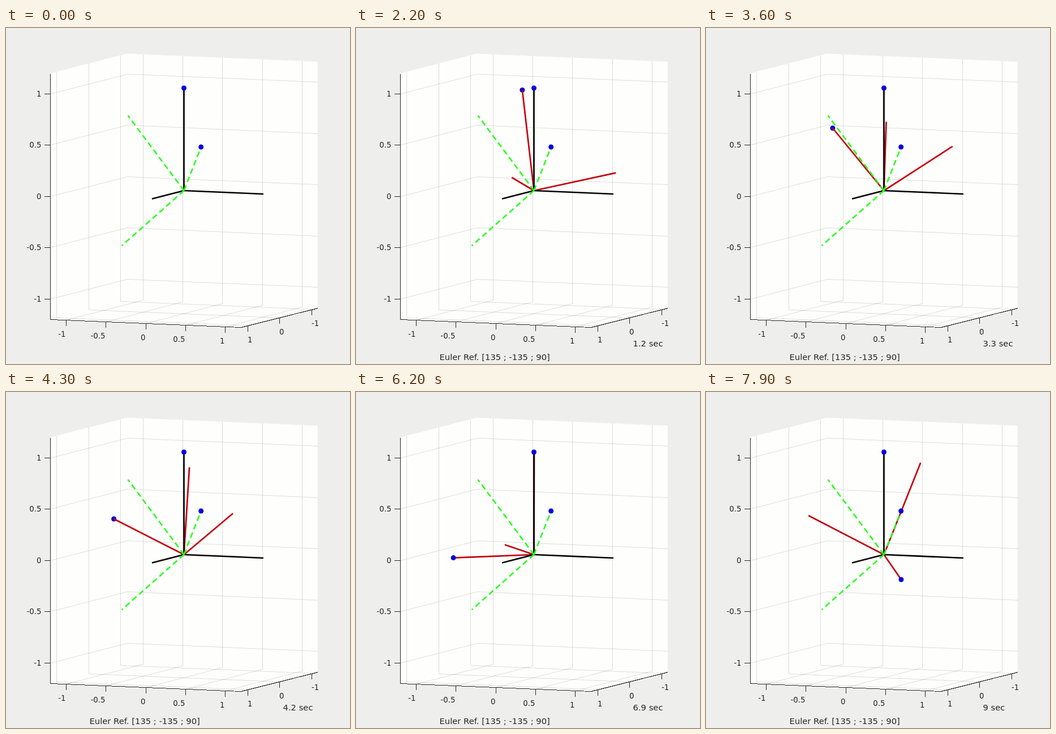
An HTML page that plays this animation: 608 by 593 pixels, repeating every 8 s.

```html
<!DOCTYPE html>
<html lang="en">
<head>
<meta charset="utf-8">
<title>Attitude manoeuvre</title>
<style>
  html, body { margin: 0; width: 100%; height: 100%; overflow: hidden; background: #eeeeec; }
  svg { display: block; width: 608px; height: 593px; }
  text { font-family: "DejaVu Sans", Verdana, sans-serif; font-size: 13.33px; fill: #262626; }
  .note { font-size: 14.75px; }
  .wall { fill: #fefefc; }
  .grid { stroke: #262626; stroke-opacity: .15; }
  .axis { stroke: #262626; fill: none; shape-rendering: crispEdges; }
  .base { stroke: #000; stroke-width: 2.7; }
  .body { stroke: #c4000f; stroke-width: 2.7; }
  .goal { stroke: #2cff22; stroke-width: 2.7; stroke-dasharray: 10 6; }
  .dot { fill: #0800dc; }
</style>
</head>
<body>
<svg id="stage" viewBox="0 0 608 593"></svg>
<script>
const LOOP = 8000, REF_AT = 1000, RUN_AT = 1300, FRAME = 100;
const stage = document.getElementById("stage");

// Orthographic view of data space
const project = ([x, y, z]) => [
  314.5 + 140.5 * x - 56.5 * y,
  287 + 6 * x + 14.5 * y - 181 * z
];
const depth = ([x, y, z]) => 0.37 * x + 0.925 * y + 0.087 * z;
const ORIGIN = project([0, 0, 0]);

// The plot box is drawn on whole pixels
function snap(point) {
  const [x, y] = project(point);
  return [Math.round(x) + 0.5, Math.floor(y) + 0.5];
}

function add(tag, attrs, parent = stage) {
  const el = document.createElementNS("http://www.w3.org/2000/svg", tag);
  for (const key in attrs) el.setAttribute(key, attrs[key]);
  parent.appendChild(el);
  return el;
}
function line(cls, [x1, y1], [x2, y2], parent) {
  return add("line", { class: cls, x1, y1, x2, y2 }, parent);
}
function dot([cx, cy], parent) {
  return add("circle", { class: "dot", cx, cy, r: 4.5 }, parent);
}
function label(str, x, y, anchor = "start", cls = "") {
  const el = add("text", { x, y, "text-anchor": anchor, class: cls });
  el.textContent = str;
  return el;
}

// Plot box
const L = 1.2;
const rim = [[-L, L, L], [-L, L, -L], [L, L, -L], [L, -L, -L]];
const wall = [...rim, [L, -L, L], [-L, -L, L]];
add("polygon", { class: "wall", points: wall.map(project).join(" ") });

const grid = (a, b) => line("grid", snap(a), snap(b));
function tick(at, dx, dy) {
  const [x, y] = snap(at);
  line("axis", [x, y], [x + dx, y + dy]);
  return [x, y];
}
for (const v of [-1, -0.5, 0, 0.5, 1]) {
  grid([v, -L, -L], [v, -L, L]);
  grid([v, -L, -L], [v, L, -L]);
  grid([-L, L, v], [-L, -L, v]);
  grid([-L, -L, v], [L, -L, v]);
  const [x, y] = tick([v, L, -L], 0, 10);
  label(v, x - 1, y + 29, "end");
  const [zx, zy] = tick([-L, L, v], -11, 0);
  label(v, zx - 16, zy + 4.5, "end");
}
for (const v of [-1, 0, 1]) {
  grid([-L, v, -L], [-L, v, L]);
  grid([-L, v, -L], [L, v, -L]);
  const [x, y] = tick([L, v, -L], 0, 10);
  label(v, x - 0.5, y + 29);
}
add("polyline", { class: "axis", points: rim.map(snap).join(" ") });

// Moving frame below, fixed and goal frames above
const body = add("g", {});
const bodyDot = dot(ORIGIN, body);
const bodyLines = [0, 1, 2].map(() => line("body", ORIGIN, ORIGIN, body));

function triad(cls, ends) {
  for (const end of ends) line(cls, ORIGIN, end);
  dot(ends[2]);
}
triad("base", [[1, 0, 0], [0, 1, 0], [0, 0, 1]].map(project));
triad("goal", [[215.5, 154.5], [204.5, 384.3], [344.7, 210]]);

const ref = label("Euler Ref. [135 ; -135 ; 90]", 147.5, 586, "start", "note");
const clock = label("", 489.5, 562, "start", "note");

// Moments at which the picture rests for one frame
const rests = [1500, 2100, 3000, 3400, 4400, 4800, 6700, 7000, 7300, 7700];
function stepAt(time) {
  if (time < RUN_AT) return 0;
  return 1 + Math.floor((time - RUN_AT) / FRAME) - rests.filter(t => t <= time).length;
}

// Key poses: step, seconds, roll, pitch, yaw
const poses = [
  [0, 0, 0, 0, 0],
  [3, 0.4, 2.5, -2.5, -1.7],
  [14, 2.3, 31, -21.2, -26.3],
  [18, 3, 46, -23, -43.8],
  [27, 4.2, 71.1, -19.7, -74.5],
  [37, 5.8, 87.4, -4.5, -114.4],
  [48, 7.6, 90, -1, -151],
  [51, 8.1, 89.8, -2, -175.5],
  [57, 9, 100, -23.7, -217.7]
];

// Smooth curve through one column of the key poses
function slope(i, col) {
  const gap = j => poses[j + 1][0] - poses[j][0];
  const rate = j => (poses[j + 1][col] - poses[j][col]) / gap(j);
  if (i === 0) return 0;
  if (i === poses.length - 1) return rate(i - 1);
  return (rate(i - 1) * gap(i) + rate(i) * gap(i - 1)) / (gap(i - 1) + gap(i));
}
function curve(step, col) {
  const next = poses.findIndex(p => p[0] > step);
  const i = (next < 0 ? poses.length - 1 : next) - 1;
  const a = poses[i], b = poses[i + 1];
  const h = b[0] - a[0], s = (step - a[0]) / h, r = 1 - s;
  return a[col] * (1 + 2 * s) * r * r + b[col] * (3 - 2 * s) * s * s
    + h * s * r * (slope(i, col) * r - slope(i + 1, col) * s);
}

// Body axes for roll, pitch and yaw
function axes(angles) {
  const [sr, sp, sy] = angles.map(Math.sin);
  const [cr, cp, cy] = angles.map(Math.cos);
  return [
    [cy * cp, sy * cp, -sp],
    [cy * sp * sr - sy * cr, sy * sp * sr + cy * cr, cp * sr],
    [cy * sp * cr + sy * sr, sy * sp * cr - cy * sr, cp * cr]
  ];
}

function render(time) {
  const step = stepAt(time);
  body.style.display = ref.style.display = time < REF_AT ? "none" : "";
  clock.textContent = step ? +curve(step, 1).toFixed(1) + " sec" : "";

  const dirs = axes([2, 3, 4].map(col => curve(step, col) * Math.PI / 180));
  const ends = dirs.map(project);
  ends.forEach(([x, y], i) => {
    bodyLines[i].setAttribute("x2", x);
    bodyLines[i].setAttribute("y2", y);
  });
  bodyDot.setAttribute("cx", ends[2][0]);
  bodyDot.setAttribute("cy", ends[2][1]);
  // A tip pointing away from the viewer sits behind its line
  body.insertBefore(bodyDot, depth(dirs[2]) < 0 ? bodyLines[0] : null);
}

const start = performance.now();
function loop() {
  render((performance.now() - start) % LOOP);
  requestAnimationFrame(loop);
}
loop();
</script>
</body>
</html>
```
